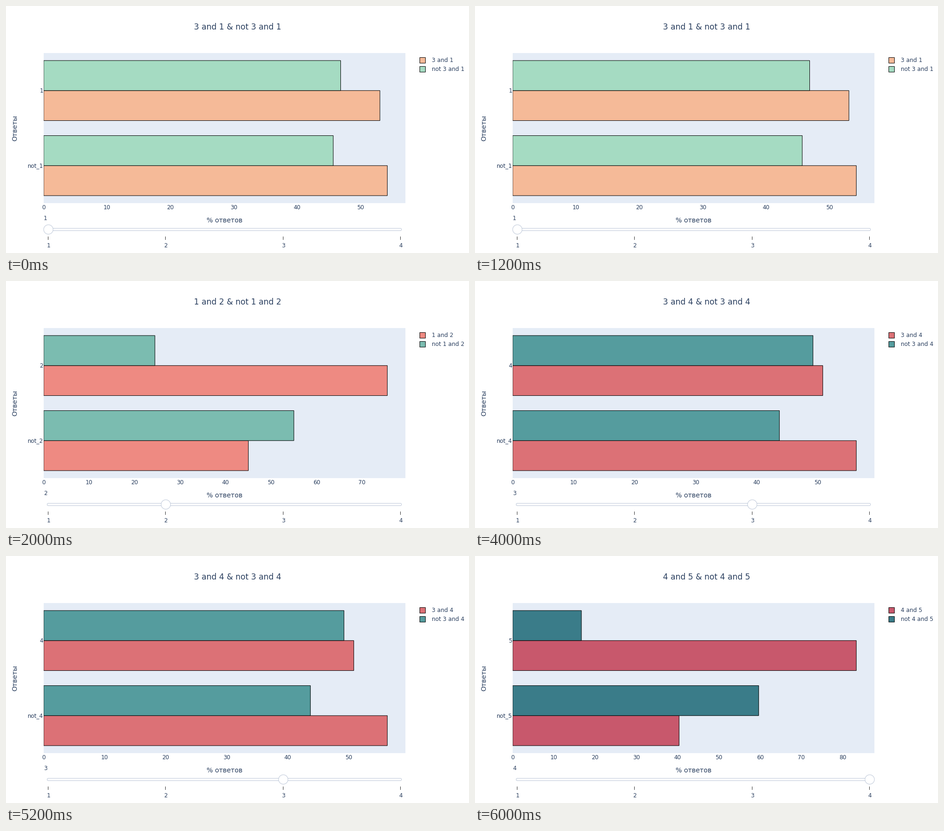
A matplotlib script for the animation above (8 s loop, 983 by 525 pixels).

```python
import matplotlib.pyplot as plt
import numpy as np
from matplotlib.animation import FuncAnimation
from matplotlib.patches import Circle, FancyBboxPatch, Rectangle

W, H, DPI = 983, 525, 100
LEFT, TOP, PLOT_W, PLOT_H = 80, 100, 768, 319
INK, RAIL = "#2a3f5f", "#bec8d9"

plt.rcParams["font.family"] = "DejaVu Sans"
PX = 72 / DPI  # points per pixel

# first answer, second answer, share for the answer, share for its
# negation, colour of the pair, colour of the negated pair
STEPS = [
    (3, 1, 53.10, 54.27, (245, 186, 152), (165, 219, 194)),
    (1, 2, 75.55, 45.00, (238, 138, 130), (123, 188, 176)),
    (3, 4, 50.80, 56.30, (220, 113, 118), (85, 156, 158)),
    (4, 5, 83.33, 40.35, (200, 88, 108), (58, 124, 137)),
]

fig = plt.figure(figsize=(W / DPI, H / DPI), dpi=DPI, facecolor="white")
ax = fig.add_axes([0, 0, 1, 1])
ax.set_xlim(0, W)
ax.set_ylim(H, 0)
ax.axis("off")


def label(x, baseline, text="", size=12, ha="center", **kw):
    return ax.text(x, baseline, text, fontsize=size * PX, color=INK,
                   ha=ha, va="baseline", **kw)


def box(x, y, w, h, **kw):
    return ax.add_patch(Rectangle((x, y), w, h, **kw))


plot_area = box(LEFT, TOP, PLOT_W, PLOT_H, fc="#e5ecf6", lw=0)
title = label(492, 50, size=17)
label(464.5, 460, "% ответов", size=14)
label(23, 259.5, "Ответы", size=14, rotation=90, rotation_mode="anchor")

# Two groups of two bars: the pair below, its negation above.
CATEGORY = PLOT_H / 2
BAR_H = CATEGORY * 0.4
group_tops = [TOP + CATEGORY * (i + 0.1) for i in range(2)]


def make_bars(offset):
    bars = [box(LEFT, y + offset, 0, BAR_H, ec="black", lw=PX, snap=False,
                zorder=2) for y in group_tops]
    for bar in bars:
        bar.set_clip_path(plot_area)
    return bars


pair_bars = make_bars(BAR_H)
negated_bars = make_bars(0)

row_labels = [label(79, y, ha="right") for y in (184, 343)]
tick_labels = [label(0, 432) for _ in range(9)]

swatches = [box(877.5, y, 12, 12, ec="black", lw=PX) for y in (108.5, 127.5)]
legend_labels = [label(903.5, y, ha="left") for y in (119, 138)]

# Slider
stops = np.linspace(90, 838, 4)
ax.add_patch(FancyBboxPatch((87.5, 472.5), 752, 5, fc="white", ec=RAIL, lw=PX,
                            boxstyle="round,pad=0,rounding_size=2"))
for i, x in enumerate(stops):
    box(np.floor(x - 0.5), 490, 1, 7, fc="#333333", lw=0)
    label(x, 513, str(i + 1))
grip = ax.add_patch(Circle((stops[0], 475), 10, fc="white", ec=RAIL, lw=PX,
                           zorder=3))
current = label(80, 455, ha="left")


def update(i):
    first, second, share, negated_share, *colors = STEPS[i]
    pair_color, negated_color = (np.array(c) / 255 for c in colors)
    shares = share, negated_share
    scale = 0.95 * PLOT_W / max(*shares, *(100 - s for s in shares))

    for value, pair_bar, negated_bar in zip(shares, pair_bars, negated_bars):
        pair_bar.set(width=value * scale, facecolor=pair_color)
        negated_bar.set(width=(100 - value) * scale, facecolor=negated_color)

    name = f"{first} and {second}"
    title.set_text(f"{name} & not {name}")
    for text, row in zip(row_labels, (f"{second}", f"not_{second}")):
        text.set_text(row)
    for text, entry in zip(legend_labels, (name, f"not {name}")):
        text.set_text(entry)
    for swatch, color in zip(swatches, (pair_color, negated_color)):
        swatch.set_facecolor(color)

    for k, text in enumerate(tick_labels):
        x = 10 * k * scale
        text.set(x=LEFT + x, text=str(10 * k), visible=x <= PLOT_W)

    grip.center = stops[i], 475
    current.set_text(str(i + 1))
    return []


anim = FuncAnimation(fig, update, frames=len(STEPS), interval=2000,
                     repeat=True, repeat_delay=0)
plt.show()
```
